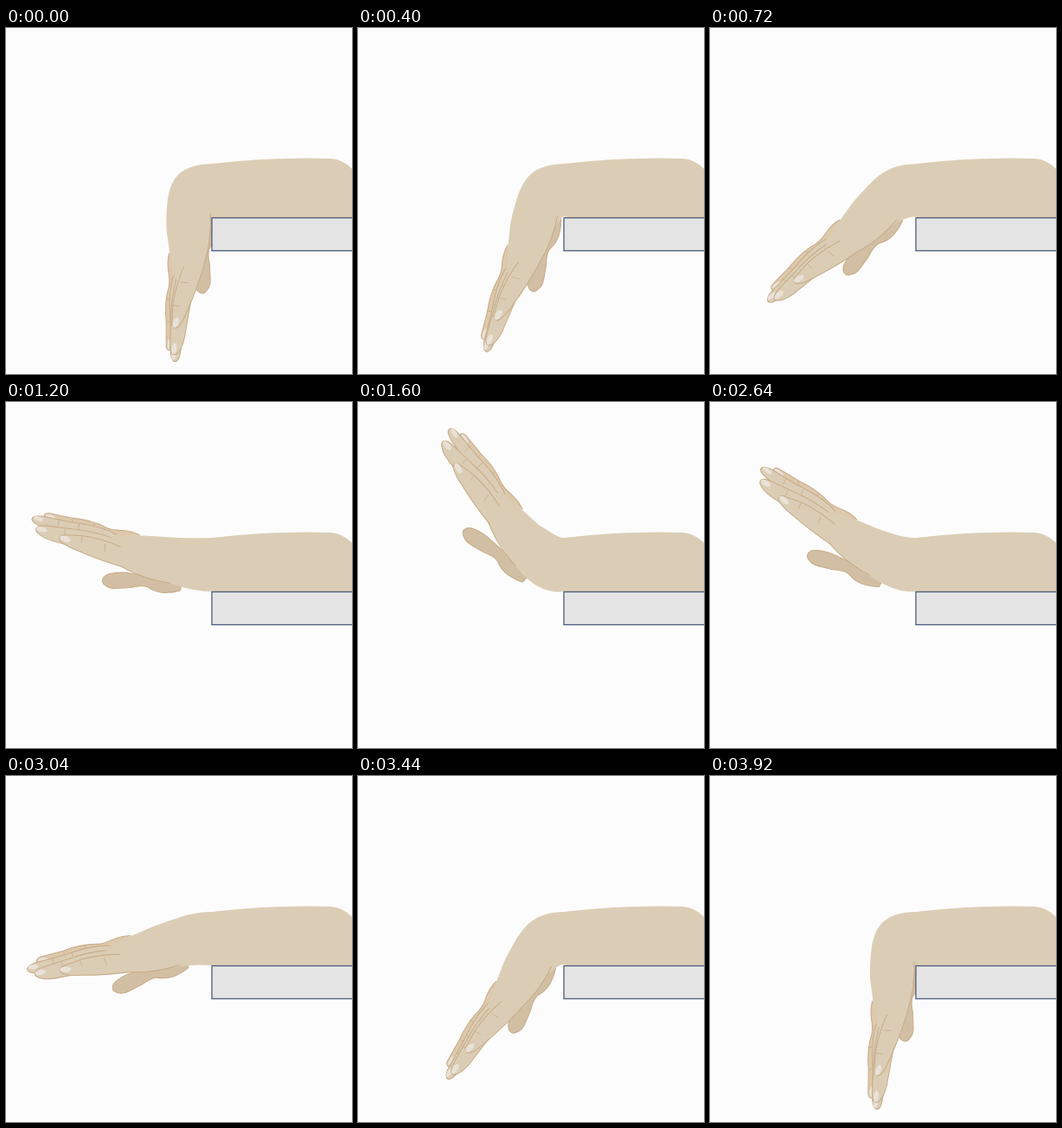
Animation, 400 px wide and 400 px high, one loop 4000 ms. Source, as an HTML page:

```html
<!DOCTYPE html>
<html lang="en">
<head>
<meta charset="utf-8">
<title>Wrist flexion and extension</title>
<style>
  html, body { margin: 0; width: 100%; height: 100%; overflow: hidden; background: #fcfcfc; }
  svg { display: block; width: 100%; height: 100%; }
  .line { stroke: #c8ae8b; stroke-width: 1.1; stroke-linecap: round; stroke-linejoin: round; }
  .thin { stroke-width: .8; fill: none; }
  .skin { fill: #dbcdb5; }
  .nail { fill: #e9e1d7; stroke: none; }
</style>
</head>
<body>
<svg viewBox="0 0 400 400">
  <!-- Hand parts are drawn pointing left, with the wrist joint at 0,0 -->
  <g class="hand">
    <path id="thumb" class="line" fill="#d2bfa3"
      d="M-50 22 L-67 24 Q-80 25 -89 29 C-102 34 -101 43 -94 45 Q-88 48 -80 45 L-65 40 Q-54 34 -47 34.500 Q-38 38 -28 36.500 Q-17 34 -9 29 L-10 15"/>
    <path class="line" fill="#dec8ab"
      d="M-70 -19 Q-78 -21 -90 -18.500 Q-100 -15.500 -108 -16 Q-128 -20 -150 -15.500 L-178 -13 Q-184 -11 -181 -7 L-150 -3 L-90 -4"/>
    <path class="line thin" d="M-124 -18 l2 7 M-149.500 -14.500 l1.500 5"/>
    <ellipse class="nail" cx="-175" cy="-10" rx="6" ry="2"/>
  </g>
  <path id="arm" class="skin"/>
  <g class="hand">
    <g class="line skin">
      <path d="M-96 -12 C-112 -16 -130 -14 -150 -10.500 L-184 -7.500 Q-196 -5 -194 0 Q-191 4 -180 4 L-95 4"/>
      <path class="thin" d="M-164 -9 l1 7 M-140.500 -11 l1.500 8"/>
      <ellipse class="nail" cx="-187" cy="-3.500" rx="6" ry="2.600"/>
    </g>
    <g id="second" class="line skin">
      <path d="M-101 -7 Q-125 -8 -145 -4 L-176 1 C-187 3 -190 8 -183 12 Q-175 17 -155 15.500 L-95 14"/>
      <path class="thin" d="M-154 -2 l1 7"/>
      <ellipse class="nail" cx="-180" cy="6.500" rx="6.500" ry="3" transform="rotate(-4 -180 6)"/>
    </g>
    <g id="index" class="line skin">
      <path d="M-87 0 Q-112 -3 -132 0 L-150 4 C-160 6 -159 12 -153 14 Q-146 17 -134 18 Q-105 22 -78 22"/>
      <path class="thin" d="M-105 2 l2 8 M-133 0 l1.500 8"/>
      <ellipse class="nail" cx="-151" cy="9" rx="6.500" ry="3.200" transform="rotate(6 -151 9)"/>
    </g>
    <path class="line" fill="none" d="M-79 22 Q-60 26 -46 26 Q-32 26 -20 24"/>
  </g>
  <rect x="238" y="219.500" width="170" height="38" fill="#e4e4e4" stroke="#4d5b7b" stroke-width="1.300"/>
</svg>
<script>
const PERIOD = 4000, JOINT = [217, 190];
const byId = id => document.getElementById(id);
const hands = document.querySelectorAll('.hand');

// Degrees above horizontal; the upward swing lags slightly.
function wristAngle(ms) {
  const turn = 2 * Math.PI / PERIOD;
  const phase = (ms - 10 - 10 * Math.sin(ms * turn)) * turn;
  return -6 - 78 * Math.cos(phase) - .9 * Math.cos(2 * phase);
}

function turnPart(id, angle, x, y) {
  byId(id).setAttribute('transform', `rotate(${angle} ${x} ${y})`);
}

// Fixed forearm joined to the palm by two flexible curves.
function armPath(a, shift) {
  const cos = Math.cos(a * Math.PI / 180), sin = Math.sin(a * Math.PI / 180);
  const p = (x, y) => {
    x += shift[0];
    y += shift[1];
    return `${(JOINT[0] + x * cos - y * sin).toFixed(2)} ${(JOINT[1] + x * sin + y * cos).toFixed(2)} `;
  };
  const top = 24 - .31 * a, bottom = 17 + .2 * a;
  return `M238 157 C${238 - top} ${157 + .03 * top} ${p(-20 - .27 * a, -29)} ${p(-45, -24.5)}` +
    `L${p(-70, -18.5)} L${p(-98, -10)} L${p(-98, 10)} L${p(-79, 22)} Q${p(-60, 26)} ${p(-40, 25)}` +
    `C${p(-15 + .25 * a, 25)} ${240 - bottom} ${218.5 + .075 * a} 240 219` +
    'L402 220 V165 Q391 152 375 151 Q310 149 238 157Z';
}

function draw() {
  const a = wristAngle(performance.now() % PERIOD);
  // The palm slides a little over the joint as it bends.
  const shift = [.02 * a - .8, .05 * a + 1.5];
  for (const hand of hands)
    hand.setAttribute('transform', `translate(${JOINT}) rotate(${a}) translate(${shift})`);
  turnPart('thumb', -.128 * a, -12, -41);
  turnPart('second', -.065 * (a - 10), -85, 5);
  turnPart('index', -.115 * (a - 10), -80, 12);
  byId('arm').setAttribute('d', armPath(a, shift));
  requestAnimationFrame(draw);
}
draw();
</script>
</body>
</html>
```
